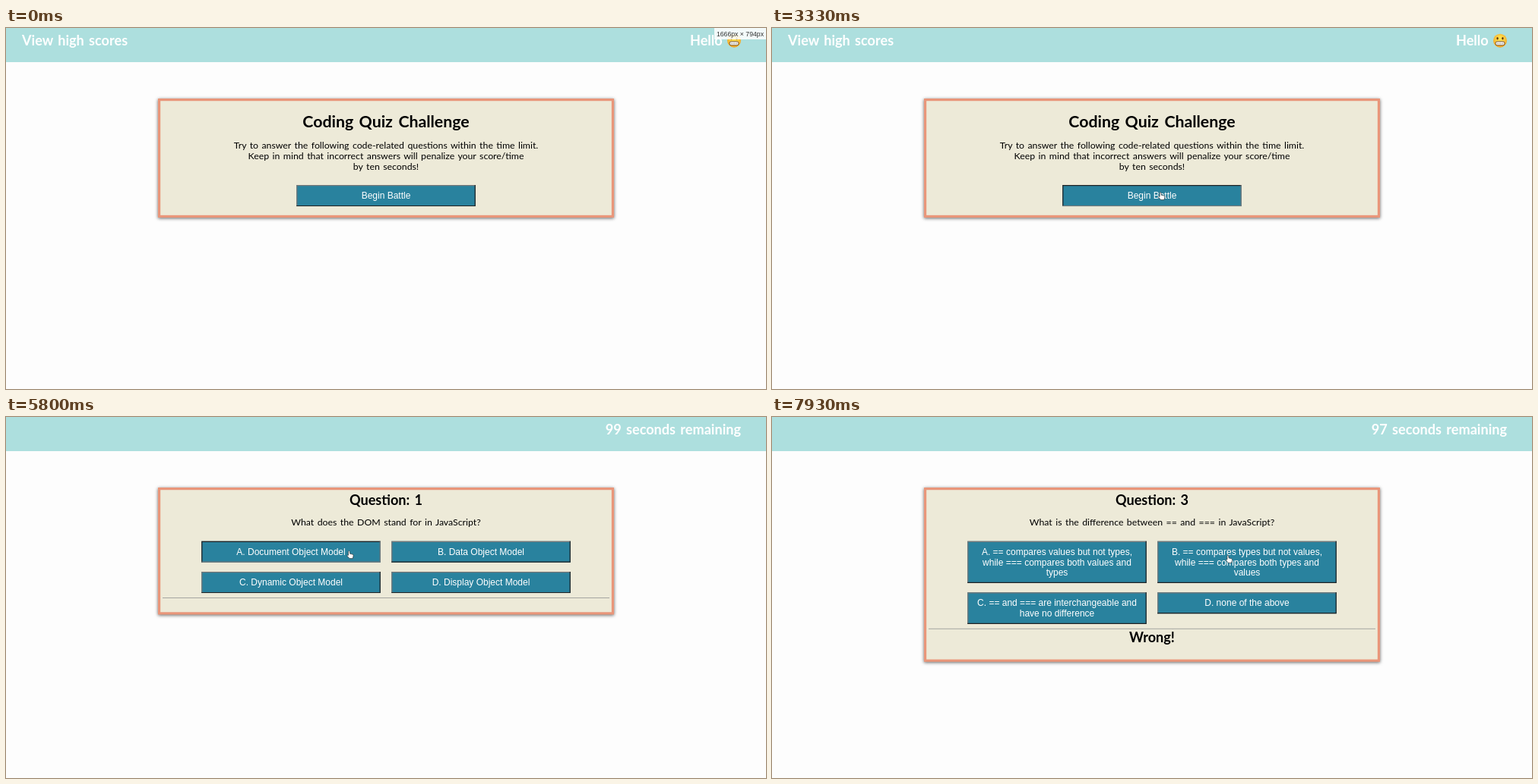
Write an HTML page that moves like this. It is 1000 px wide and 476 px high and loops after 8000 ms.

```html
<!DOCTYPE html>
<html lang="en">
<head>
<meta charset="utf-8">
<title>Coding quiz</title>
<style>
  html, body { margin: 0; width: 100%; height: 100%; overflow: hidden; background: #fdfdfd; }
  svg { display: block; width: 1000px; height: 476px; }
  text { font: 12.3px Lato, "Open Sans", sans-serif; word-spacing: .108em; text-anchor: middle; }
  .title { font-size: 21.3px; font-weight: 700; }
  .head { font-size: 18.1px; font-weight: 700; }
  .bar { fill: #fff; }
  .left { text-anchor: start; }
  .right { text-anchor: end; }
  .label, .tip { font: 12px "Liberation Sans", Arial, sans-serif; fill: #fff; word-spacing: 0; }
  .tip { font-size: 8.7px; fill: #333; }
  .card { fill: #edead8; stroke: #e9967a; stroke-width: 3.2; filter: drop-shadow(0 1.5px 2px rgba(0, 0, 0, .6)); }
</style>
</head>
<body>
<svg viewBox="0 0 1000 476">
  <defs>
    <radialGradient id="face" cy=".4" r=".6">
      <stop offset=".3" stop-color="#ffdf4d"/>
      <stop offset="1" stop-color="#f0a024"/>
    </radialGradient>
    <g id="grimace">
      <circle cx="958" cy="16.7" r="9" fill="url(#face)"/>
      <ellipse cx="954.6" cy="13.8" rx="1.2" ry="1.7" fill="#5b3410"/>
      <ellipse cx="961.4" cy="13.8" rx="1.2" ry="1.7" fill="#5b3410"/>
      <rect x="952" y="17.8" width="12" height="5" rx="2.3" fill="#fff" stroke="#5b3410" stroke-width=".8"/>
      <path d="M952 20.3h12M955 18v4.6M958 18v4.6M961 18v4.6" stroke="#8a7a6a" stroke-width=".4"/>
    </g>
    <path id="arrow" d="M0 0V6L1.5 4.8 2.5 7 3.6 6.5 2.6 4.4H4.4Z" fill="#111" stroke="#fff" stroke-width=".5"/>
    <path id="hand" d="M.4 1Q1.3-.7 2.2 1L2.6 4 6 4.8Q7.3 5.2 7.1 6.6L6.2 10.3H2L-1.2 6.8Q-1.2 5.2.5 6Z"
      fill="#fff" stroke="#222" stroke-width=".6"/>
  </defs>
  <rect width="1000" height="45" fill="#addfde"/>
  <g id="page"></g>
  <use id="cursor"/>
</svg>
<script>
const LOOP = 8000;
const START = 3460;
const page = document.getElementById('page');
const cursor = document.getElementById('cursor');

const questions = [
  { from: START, press: 5800, pick: 0, result: '',
    ask: 'What does the DOM stand for in JavaScript?',
    answers: ['A. Document Object Model', 'B. Data Object Model',
      'C. Dynamic Object Model', 'D. Display Object Model'] },
  { from: 6000, press: 7330, pick: 1, result: 'Correct',
    ask: 'What keyword is used to declare a variable in JavaScript??',
    answers: ['A. let', 'B. var', 'C. const', 'D. all of the above'] },
  { from: 7530, press: LOOP, pick: -1, result: 'Wrong!',
    ask: 'What is the difference between == and === in JavaScript?',
    answers: ['A. == compares values but not types,|while === compares both values and|types',
      'B. == compares types but not values,|while === compares both types and|values',
      'C. == and === are interchangeable and|have no difference', 'D. none of the above'] }
];

// Pointer stops: time, x, y
const stops = [
  [330, 1000, 190], [1000, 513.5, 240.5], [1530, 513.5, 240.5], [2330, 509.7, 216.3],
  [4330, 509.7, 216.3], [5130, 450, 176.3], [6260, 450, 176.3], [6930, 604.5, 177.3],
  [7730, 604.5, 177.3], [7930, 598.5, 182]
];

let buttons = [];

const text = (x, y, s, cls = '') => `<text x="${x}" y="${y}" class="${cls}">${s}</text>`;
const card = bottom => `<rect class="card" x="201.6" y="94.6" width="596.8" height="${bottom - 96.2}"/>`;
const buttonHeight = label => 14.5 + 13.6 * label.split('|').length;

function button(x, y, label, pressed) {
  const w = 235.6, h = buttonHeight(label);
  buttons.push({ x, y, w, h });
  const [lit, dark] = pressed ? ['#222', '#777'] : ['#777', '#222'];
  return `<rect x="${x}" y="${y}" width="${w}" height="${h}" fill="#29829e"/>
    <path d="M${x + .6} ${y + h}V${y + .6}H${x + w}" fill="none" stroke="${lit}" stroke-width="1.2"/>
    <path d="M${x} ${y + h - .6}H${x + w - .6}V${y}" fill="none" stroke="${dark}" stroke-width="1.2"/>` +
    label.split('|').map((s, i) => text(x + w / 2, y + 18.2 + 13.7 * i, s, 'label')).join('');
}

function intro(t) {
  return text(21, 23, 'View high scores', 'head bar left') + card(250) +
    text(500, 131, 'Coding Quiz Challenge', 'title') +
    text(500, 159, 'Try to answer the following code-related questions within the time limit.') +
    text(500, 172.8, 'Keep in mind that incorrect answers will penalize your score/time') +
    text(500, 186.6, 'by ten seconds!') +
    button(382.2, 207, 'Begin Battle', t >= 3330);
}

function quiz(t) {
  const n = questions.findLastIndex(q => t >= q.from);
  const { ask, answers, pick, press, result } = questions[n];
  const heights = answers.map(buttonHeight);
  const top = 163.7;
  const second = top + Math.max(heights[0], heights[1]) + 12.2;
  const rule = second + Math.max(heights[2], heights[3]) + 6.4;
  return card(rule + (result ? 43.5 : 22)) +
    text(500, 116, `Question: ${n + 1}`, 'head') + text(500, 143.3, ask) +
    answers.map((a, i) => button(i % 2 ? 507.2 : 257.2, i < 2 ? top : second, a,
      i === pick && t >= press)).join('') +
    `<path d="M206 ${rule}H794" stroke="#a5a5a0"/>` +
    text(500, rule + 17.7, result, 'head');
}

function header(t) {
  if (t >= START + 1000) {
    const left = 101 - Math.floor((t - START) / 1000);
    return text(967, 23, `${left} seconds remaining`, 'head bar right');
  }
  const sizeTip = t < 330
    ? '<rect x="932" width="68" height="15" fill="#fff" fill-opacity=".85"/>' +
      text(966, 11, '1666px × 794px', 'tip')
    : '';
  return text(900, 23, 'Hello', 'head bar left') + '<use href="#grimace"/>' + sizeTip;
}

function pointer(t) {
  const next = stops.findIndex(s => s[0] > t);
  if (next < 0) return stops.at(-1).slice(1);
  const [t0, x0, y0] = stops[next - 1], [t1, x1, y1] = stops[next];
  const p = (t - t0) / (t1 - t0), e = p * p * (3 - 2 * p);
  return [x0 + (x1 - x0) * e, y0 + (y1 - y0) * e];
}

let shown = '';
function draw(now) {
  const t = now % LOOP;
  buttons = [];
  const markup = header(t) + (t < START ? intro(t) : quiz(t));
  if (markup !== shown) page.innerHTML = shown = markup;

  cursor.style.display = t < 330 ? 'none' : '';
  if (t >= 330) {
    const [x, y] = pointer(t);
    const over = buttons.some(b => x > b.x && x < b.x + b.w && y > b.y && y < b.y + b.h);
    cursor.setAttribute('href', over ? '#hand' : '#arrow');
    cursor.setAttribute('transform', `translate(${x} ${y})`);
  }
}

const begin = performance.now();
function tick() {
  draw(performance.now() - begin);
  requestAnimationFrame(tick);
}
tick();
</script>
</body>
</html>
```
